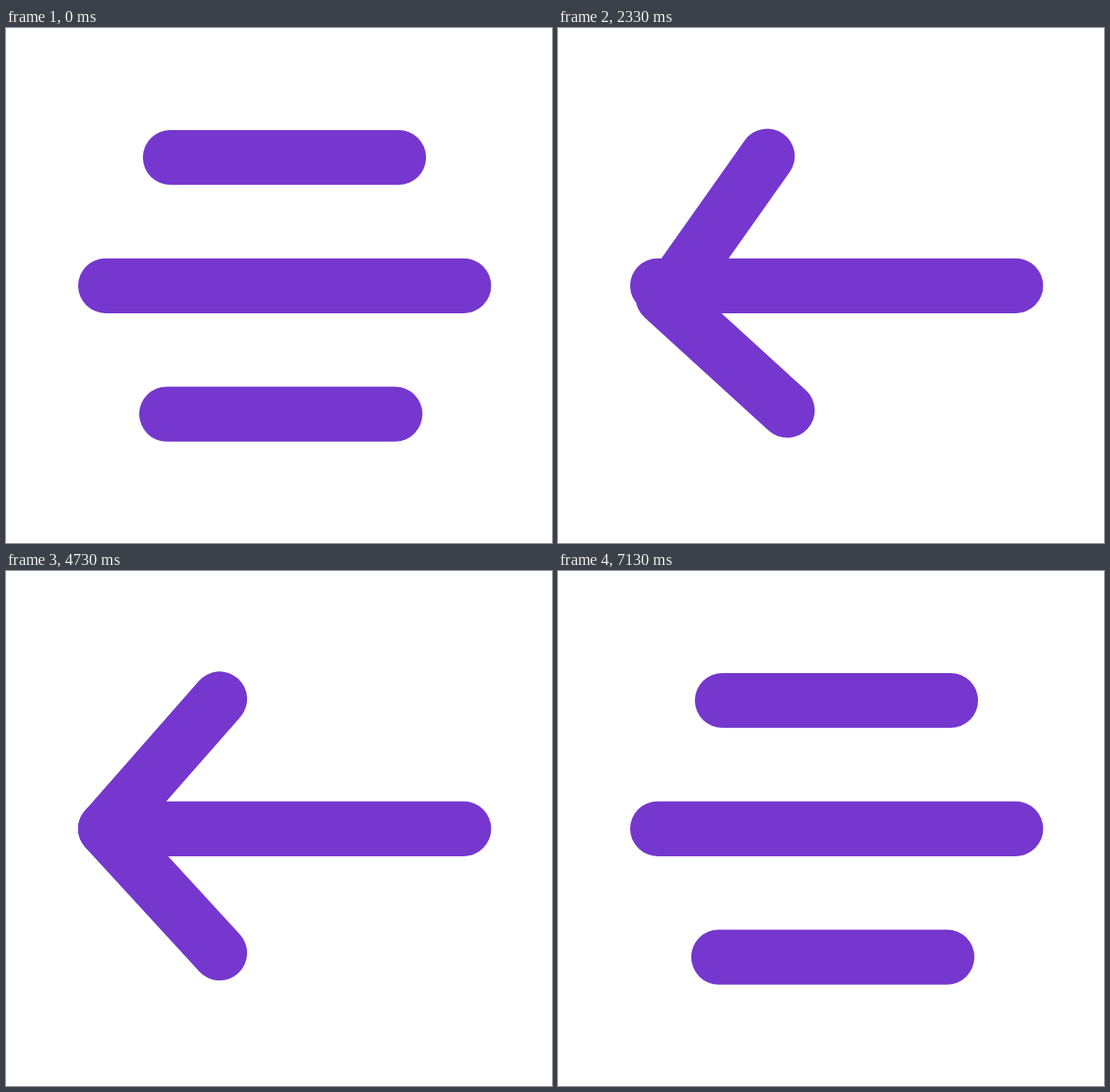
An HTML page that plays this animation: 598x565 px, repeating every 8000 ms.

```html
<!DOCTYPE html>
<html lang="en">
<head>
<meta charset="utf-8">
<title>Menu to arrow</title>
<style>
  html, body { margin: 0; width: 100%; height: 100%; overflow: hidden; background: #fff; }
  svg { display: block; width: 598px; height: 565px; }
  path { fill: none; stroke: #7537cd; stroke-width: 60.2; stroke-linecap: round; }
</style>
</head>
<body>
<svg viewBox="0 0 598 565">
  <path id="top" d="M180 142L430 142"/>
  <path d="M109.1 282.8H501.3"/>
  <path id="bottom" d="M176 423.6L426 423.6"/>
</svg>
<script>
  const LOOP = 8000, STEP = 200 / 3;

  // Each bar: end points as menu, end points as arrow head
  const bars = {
    top: [[180, 142, 430, 142], [234, 140.4, 109.1, 282.8]],
    bottom: [[176, 423.6, 426, 423.6], [109.1, 282.8, 234, 419.1]]
  };

  const easeIn = n => t => t ** n;
  const easeOut = n => t => 1 - (1 - t) ** n;
  const easeInOut = n => t => t < 0.5 ? (2 * t) ** n / 2 : 1 - (2 - 2 * t) ** n / 2;

  // Alternately to the arrow and back to the menu
  const moves = [
    { start: 645, end: 1140, ease: easeOut(2.3) },
    { start: 2225, end: 2790, ease: easeInOut(1.8) },
    { start: 4300, end: 4710, ease: easeIn(3.35) },
    { start: 6360, end: 6650, ease: easeInOut(1.5) }
  ];

  const clamp = x => Math.min(1, Math.max(0, x));

  function arrowAmount(time) {
    return moves.reduce((sum, { start, end, ease }, i) => {
      const p = ease(clamp((time - start) / (end - start)));
      return sum + (i % 2 ? -p : p);
    }, 0);
  }

  function draw(time) {
    const k = arrowAmount(time);
    for (const id in bars) {
      const [menu, arrow] = bars[id];
      const [x1, y1, x2, y2] = menu.map((v, i) => (v + (arrow[i] - v) * k).toFixed(2));
      document.getElementById(id).setAttribute("d", `M${x1} ${y1}L${x2} ${y2}`);
    }
  }

  const begin = performance.now();

  function tick(now) {
    const time = Math.max(0, now - begin) % LOOP;
    // The motion runs at 15 pictures per second
    draw(Math.floor((time + 4) / STEP) * STEP);
    requestAnimationFrame(tick);
  }
  requestAnimationFrame(tick);
</script>
</body>
</html>
```
